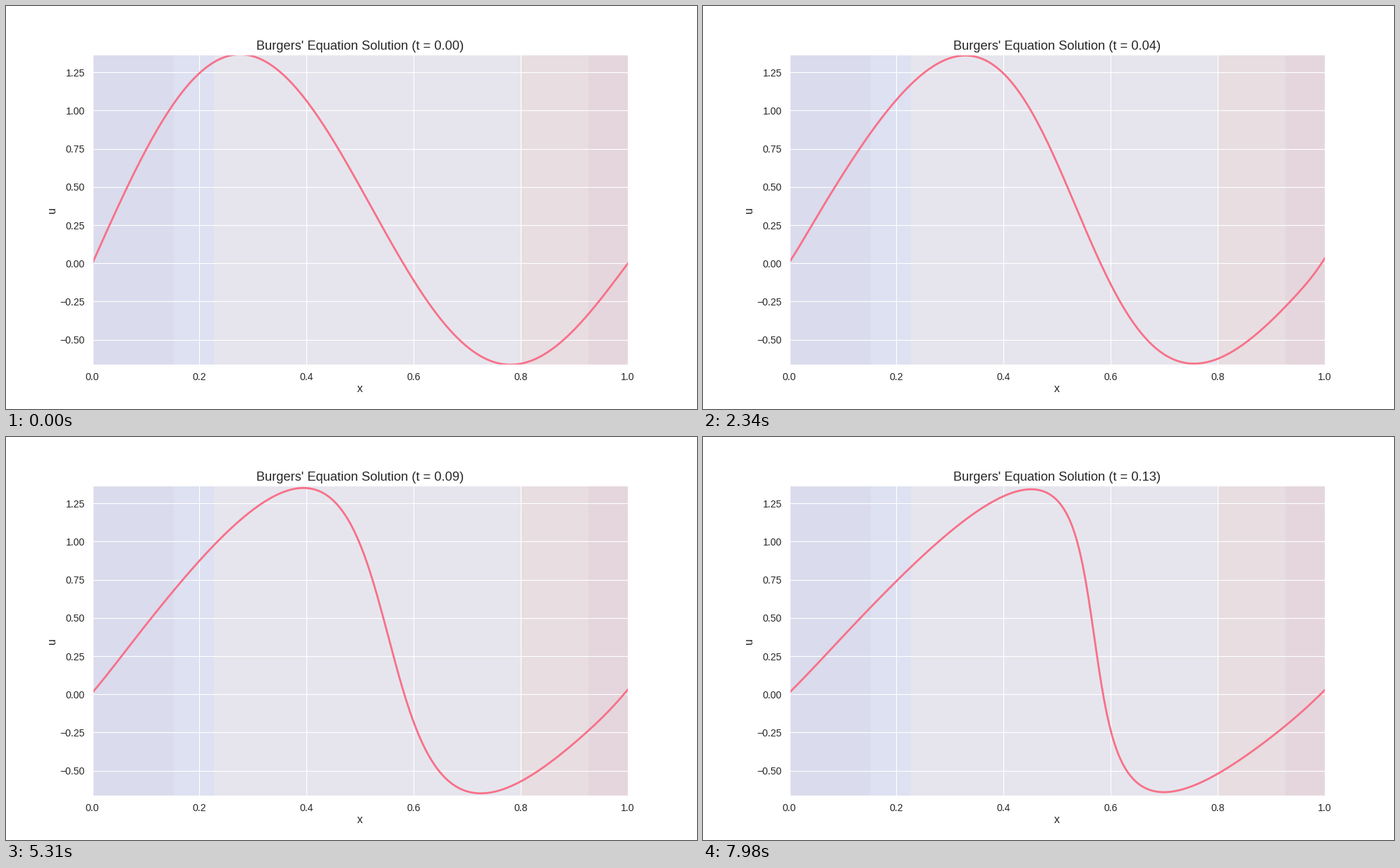
Recreate the animation shown at these times as a matplotlib script. Size 980x572 px, loop 8000 ms.

```python
import numpy as np
import matplotlib
import matplotlib.pyplot as plt
from matplotlib.animation import FuncAnimation

W, H, DPI = 980, 572, 100
FRAMES, LOOP_MS = 267, 8000
N, NU, DT = 200, 0.005, 0.0005
INK = "#262626"
PINK = "#f77189"


def pt(px):
    return px * 72 / DPI


def solve(x):
    """Forward Euler, central differences, wrapped ghost cells at both ends."""
    dx = x[1] - x[0]
    u = np.sin(2 * np.pi * x) + 0.5 * np.sin(np.pi * x)
    states = [u]
    for _ in range(FRAMES - 1):
        left, mid, right = u[:-2], u[1:-1], u[2:]
        advection = mid * (right - left) / (2 * dx)
        diffusion = NU * (right - 2 * mid + left) / dx**2
        u = u.copy()
        u[1:-1] = mid + DT * (diffusion - advection)
        u[0], u[-1] = u[-2], u[1]
        states.append(u)
    return np.array(states)


matplotlib.rcParams["font.family"] = "Liberation Sans"
matplotlib.rcParams["text.color"] = INK

x = np.linspace(0, 1, N)
states = solve(x)

fig = plt.figure(figsize=(W / DPI, H / DPI), dpi=DPI, facecolor="white")
ax = fig.add_axes([0.125, 0.11, 0.775, 0.77], facecolor="#e6e5ed")
ax.set_xlim(0, 1)
ax.set_ylim(states.min(), states.max())
ax.set_xticks(np.arange(0, 1.1, 0.2))
ax.set_yticks(np.arange(-0.5, 1.3, 0.25))
ax.xaxis.set_major_formatter("{x:.1f}")

# background bands from cool to warm
bands = [
    (0, 0.152, "#dadbec"),
    (0.152, 0.2275, "#dde1f1"),
    (0.801, 0.926, "#e8dde1"),
    (0.926, 1, "#e5d6dd"),
]
for start, end, color in bands:
    ax.axvspan(start, end, facecolor=color, edgecolor="none", zorder=0.1)

ax.set_axisbelow(True)
ax.grid(color="white", linewidth=pt(1.13))
ax.tick_params(length=0, pad=pt(10.8), labelsize=pt(14), labelcolor=INK)
for spine in ax.spines.values():
    spine.set(color="white", linewidth=pt(1.2))


def label(px, py, text, size, rotation=0):
    return fig.text(px / W, 1 - py / H, text, fontsize=pt(size), ha="center",
                    va="baseline", rotation=rotation, rotation_mode="anchor")


label(502.2, 548, "x", 16)
label(70, 290, "u", 16, 90)
title = label(502.3, 62, "", 18.3)
curve, = ax.plot([], [], color=PINK, linewidth=pt(2.8), solid_capstyle="round")


def draw(i):
    curve.set_data(x, states[i])
    title.set_text(f"Burgers' Equation Solution (t = {i * DT:.2f})")
    return curve, title


anim = FuncAnimation(fig, draw, frames=FRAMES, interval=LOOP_MS / FRAMES,
                     repeat=True, repeat_delay=0, blit=False)
plt.show()
```
